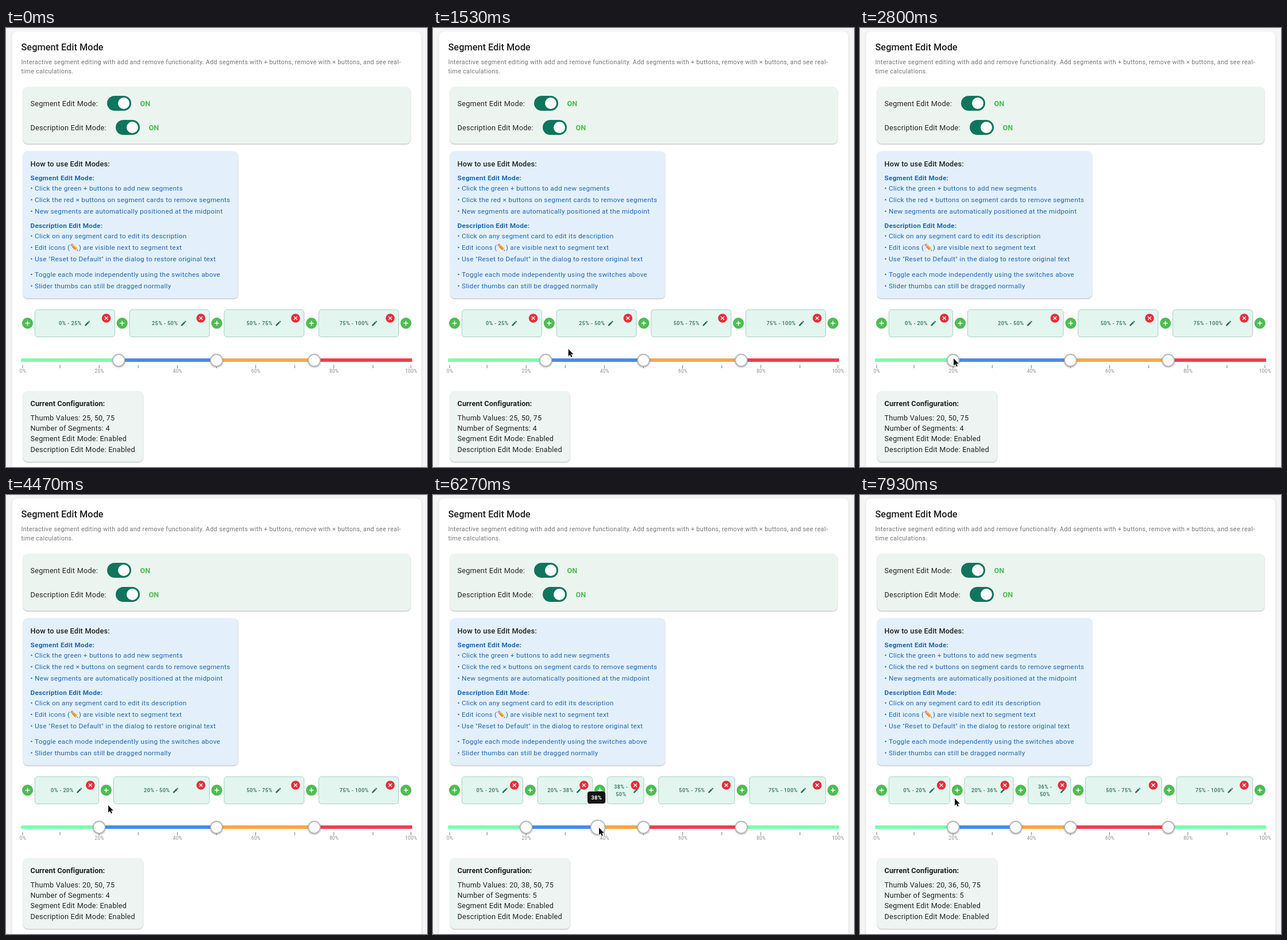
Recreate the animation shown at these times as an HTML page with a canvas. Size 733 by 764 pixels, loop 8000 ms.

```html
<!DOCTYPE html>
<html lang="en">
<head>
<meta charset="utf-8">
<title>Segment Edit Mode</title>
<style>
  html, body { margin: 0; width: 100%; height: 100%; overflow: hidden; background: #f5f5f5; }
  canvas { display: block; }
</style>
</head>
<body>
<canvas id="stage" width="733" height="764"></canvas>
<script>
const ctx = document.getElementById('stage').getContext('2d');
const LOOP = 8000, STEP = 200 / 3;
const TRACK_X = 26, TRACK_Y = 578, PX_PER_PERCENT = 6.81;
const CARDS_LEFT = 50.3, CARDS_WIDTH = 633.4, CARD_GAP = 25.7;
const TRACK_COLORS = ['#7bffae', '#4988f2', '#f9a743', '#f03e50'];
const INK = '#1f1f1f', BLUE = '#1f68b5', GREEN = '#4dbd51';
const PENCIL = new Path2D('M3 17.25V21h3.75L17.81 9.94l-3.75-3.75L3 17.25zM20.71 7.04a1 1 0 0 0 0-1.41l-2.34-2.34a1 1 0 0 0-1.41 0l-1.83 1.83 3.75 3.75 1.83-1.83z');
const ARROW = new Path2D('M0 0V12.6L2.9 9.9 4.9 14.3 6.9 13.4 5 9.2H8.9Z');

// Pointer path: time, x, y
const POINTER = [
  [66, 600, 420], [800, 441, 480], [930, 441, 480], [1733, 198, 573],
  [1980, 198, 573], [2066, 249, 573], [2200, 250, 573], [2350, 250, 573],
  [2600, 163, 575], [4333, 163, 575], [4466, 178, 540], [4870, 174, 513],
  [5420, 174, 513], [5930, 266, 578], [6266, 289, 579], [6300, 289, 579],
  [6530, 223, 579], [6630, 223, 579], [7066, 273, 580], [7420, 273, 580],
  [7930, 165, 528]
];

const thumbX = v => TRACK_X + v * PX_PER_PERCENT;
const within = (t, a, b) => t >= a && t < b;

function pointerAt(t) {
  if (t < POINTER[0][0]) return null;
  const i = POINTER.findIndex(k => k[0] > t);
  if (i < 0) return POINTER[POINTER.length - 1].slice(1);
  const [t0, x0, y0] = POINTER[i - 1], [t1, x1, y1] = POINTER[i];
  const u = (t - t0) / (t1 - t0), e = u * u * (3 - 2 * u);
  return [x0 + (x1 - x0) * e, y0 + (y1 - y0) * e];
}

function stateAt(t) {
  const pointer = pointerAt(t);
  const dragged = () => (pointer[0] - 2 - TRACK_X) / PX_PER_PERCENT;
  const firstDrag = within(t, 1990, 2700), secondDrag = within(t, 5920, 7110);
  const first = firstDrag ? dragged() : t < 1990 ? 25 : 20;
  const values = [first, 50, 75];
  if (t >= 5060) values.splice(1, 0, secondDrag ? dragged() : t < 5920 ? 35 : 36);
  return { pointer, values, active: firstDrag ? 0 : secondDrag ? 1 : -1 };
}

function setFont(size, weight = 400, spacing = 0) {
  ctx.font = `${weight} ${size}px Roboto, sans-serif`;
  ctx.letterSpacing = spacing + 'px';
}

// y is the middle of the capital letters
function text(str, x, y, size, color, { weight = 400, spacing = 0, align = 'left' } = {}) {
  setFont(size, weight, spacing);
  ctx.fillStyle = color;
  const width = ctx.measureText(str).width;
  ctx.fillText(str, align === 'center' ? x - (width - spacing) / 2 : x, y + size * 0.355);
  return x + width;
}

function box(x, y, w, h, r, fill, stroke) {
  ctx.beginPath();
  ctx.roundRect(x, y, w, h, r);
  ctx.fillStyle = fill;
  ctx.fill();
  if (stroke) { ctx.strokeStyle = stroke; ctx.lineWidth = 1; ctx.stroke(); }
}

function disc(x, y, r, fill) {
  ctx.beginPath();
  ctx.arc(x, y, r, 0, Math.PI * 2);
  ctx.fillStyle = fill;
  ctx.fill();
}

function line(x0, y0, x1, y1, color, width) {
  ctx.beginPath();
  ctx.moveTo(x0, y0);
  ctx.lineTo(x1, y1);
  ctx.strokeStyle = color;
  ctx.lineWidth = width;
  ctx.stroke();
}

function shadowed(color, blur, dy, draw) {
  ctx.save();
  ctx.shadowColor = color;
  ctx.shadowBlur = blur;
  ctx.shadowOffsetY = dy;
  draw();
  ctx.restore();
}

const panel = (x, y, w, h, fill) =>
  shadowed('rgba(0,0,0,.3)', 2, 1, () => box(x, y, w, h, 8, fill));

function toggle(label, y, x) {
  text(label, 42.5, y, 12.7, '#252525', { spacing: 0.227 });
  box(x, y - 13, 42, 26, 13, '#10755d');
  disc(x + 29, y, 10, '#fff');
  text('ON', x + 57.5, y, 12.7, GREEN, { weight: 600, spacing: 0.1 });
}

function emojiPencil(x, y) {
  ctx.save();
  ctx.translate(x, y);
  ctx.rotate(Math.PI / 4);
  box(-8, -2.3, 3, 4.6, 1, '#e98b91');
  box(-5.4, -2.3, 1.8, 4.6, 0, '#b5bcc0');
  box(-3.6, -2.3, 8, 4.6, 0, '#f4a62c');
  box(-3.6, 0.8, 8, 1.5, 0, '#d98323');
  ctx.beginPath();
  ctx.moveTo(4.4, -2.3);
  ctx.lineTo(8.6, 0);
  ctx.lineTo(4.4, 2.3);
  ctx.fillStyle = '#eccb9d';
  ctx.fill();
  disc(7.7, 0, 0.7, '#444');
  ctx.restore();
}

function drawPage() {
  ctx.fillStyle = '#f5f5f5';
  ctx.fillRect(0, 0, 733, 764);
  shadowed('rgba(0,0,0,.12)', 4, 1, () => box(10.5, 5.5, 712.5, 780, 9, '#fff'));

  text('Segment Edit Mode', 26.5, 33, 16.35, INK, { weight: 500 });
  const note = { spacing: 0.34 };
  text('Interactive segment editing with add and remove functionality. Add segments with + buttons, remove with × buttons, and see real-', 26.5, 59.5, 10.8, '#757575', note);
  text('time calculations.', 26.5, 75.5, 10.8, '#757575', note);

  panel(30, 102.5, 674, 99, '#ecf4f0');
  toggle('Segment Edit Mode:', 131, 176);
  toggle('Description Edit Mode:', 173, 191);

  panel(30, 214.5, 374, 256, '#e3f0fb');
  text('How to use Edit Modes:', 42.5, 236.5, 12.7, INK, { weight: 500, spacing: 0.2 });
  const heading = (str, y) => text(str, 42.5, y, 11.8, BLUE, { weight: 600, spacing: 0.25 });
  const item = (str, y) => text('• ' + str, 42.5, y, 11.8, BLUE, { spacing: 0.27 });
  heading('Segment Edit Mode:', 260.5);
  item('Click the green + buttons to add new segments', 279);
  item('Click the red × buttons on segment cards to remove segments', 299);
  item('New segments are automatically positioned at the midpoint', 319);
  heading('Description Edit Mode:', 343.5);
  item('Click on any segment card to edit its description', 362);
  const end = item('Edit icons (', 382);
  emojiPencil(end + 7.6, 381.8);
  text(') are visible next to segment text', end + 15.3, 382, 11.8, BLUE, { spacing: 0.27 });
  item('Use "Reset to Default" in the dialog to restore original text', 402);
  item('Toggle each mode independently using the switches above', 428.5);
  item('Slider thumbs can still be dragged normally', 448.5);
}

function wrap(label, maxWidth) {
  const lines = [];
  for (const word of label.split(' ')) {
    const joined = lines.length ? lines[lines.length - 1] + ' ' + word : word;
    if (lines.length && ctx.measureText(joined).width <= maxWidth) lines[lines.length - 1] = joined;
    else lines.push(word);
  }
  return lines;
}

function plusButton(x) {
  const y = 513.7;
  disc(x, y, 9.6, GREEN);
  line(x - 4, y, x + 4, y, '#fff', 1.5);
  line(x, y - 4, x, y + 4, '#fff', 1.5);
}

function segmentCard(x, w, from, to) {
  const font = { weight: 500, spacing: 0.42 };
  const label = `${from}% - ${to}%`, color = '#2c6b59';
  box(x, 490.2, w, 47.4, 5, '#e3f5ef', '#9fd0c1');

  setFont(9.1, font.weight, font.spacing);
  const room = w - 30.6, width = ctx.measureText(label).width;
  const lines = wrap(label, room);
  let iconX = x + w - 19.3;
  if (lines.length === 1) {
    const start = x + (w - width - 16) / 2;
    text(label, start, 514.2, 9.1, color, font);
    iconX = start + width + 4;
  } else {
    lines.forEach((str, i) => text(str, x + 7.3 + room / 2,
      514 + (i - (lines.length - 1) / 2) * 13, 9.1, color, { ...font, align: 'center' }));
  }
  ctx.save();
  ctx.translate(iconX, 508);
  ctx.scale(0.5, 0.5);
  ctx.fillStyle = color;
  ctx.fill(PENCIL);
  ctx.restore();

  const cx = x + w - 14.8, cy = 505, d = 2.8;
  disc(cx, cy, 7.8, '#e3303b');
  line(cx - d, cy - d, cx + d, cy + d, '#fff', 1.3);
  line(cx - d, cy + d, cx + d, cy - d, '#fff', 1.3);
}

function drawCards(stops) {
  const count = stops.length - 1;
  const total = CARDS_WIDTH - (count - 1) * CARD_GAP;
  let x = CARDS_LEFT;
  plusButton(37.5);
  for (let i = 0; i < count; i++) {
    const w = total * (stops[i + 1] - stops[i]) / 100;
    segmentCard(x, w, stops[i], stops[i + 1]);
    x += w + CARD_GAP;
    plusButton(i < count - 1 ? x - CARD_GAP / 2 : 696.3);
  }
}

function drawSlider(values, active) {
  const stops = [0, ...values, 100];
  ctx.save();
  ctx.beginPath();
  ctx.roundRect(TRACK_X, TRACK_Y - 3, 681.5, 6, 2);
  ctx.clip();
  for (let i = 0; i < stops.length - 1; i++) {
    ctx.fillStyle = TRACK_COLORS[i % TRACK_COLORS.length];
    ctx.fillRect(thumbX(stops[i]), TRACK_Y - 3, (stops[i + 1] - stops[i]) * PX_PER_PERCENT + 0.5, 6);
  }
  ctx.restore();

  for (let v = 0; v <= 100; v += 10) {
    const x = Math.min(705, Math.max(29, thumbX(v)));
    line(x, 586.5, x, 592, '#8c8c8c', 1.2);
    if (v % 20 === 0) text(v + '%', x + 0.3, 597.3, 8.2, '#8c8c8c', { spacing: 0.3, align: 'center' });
  }

  values.forEach((v, i) => {
    const r = i === active ? 13.2 : 11.2;
    shadowed('rgba(0,0,0,.35)', 3, 1, () => disc(thumbX(v), TRACK_Y + 0.3, r, '#b9b9b9'));
    disc(thumbX(v), TRACK_Y + 0.3, r - 1.8, '#fff');
  });
}

function drawTooltip(value) {
  const x = thumbX(value) - 0.2;
  box(x - 15.6, 516, 31.2, 21, 4, '#141414');
  text(value + '%', x, 526.7, 9.6, '#fff', { weight: 600, spacing: 0.3, align: 'center' });
}

function drawConfig(values) {
  panel(30, 632, 208.5, 123, '#edf4f2');
  text('Current Configuration:', 42.5, 653.5, 12.7, INK, { weight: 600, spacing: 0.1 });
  [
    'Thumb Values: ' + values.join(', '),
    'Number of Segments: ' + (values.length + 1),
    'Segment Edit Mode: Enabled',
    'Description Edit Mode: Enabled'
  ].forEach((str, i) => text(str, 42.5, 678 + i * 18.45, 12.7, '#252525', { spacing: 0.227 }));
}

function drawPointer([x, y]) {
  ctx.save();
  ctx.translate(x, y);
  ctx.lineJoin = 'round';
  ctx.lineWidth = 1.4;
  ctx.strokeStyle = '#fff';
  ctx.stroke(ARROW);
  ctx.fillStyle = '#111';
  ctx.fill(ARROW);
  ctx.restore();
}

function render(now) {
  const t = Math.floor((now % LOOP + 4) / STEP) * STEP;
  const { pointer, values, active } = stateAt(t);
  const rounded = values.map(Math.round);
  drawPage();
  drawCards([0, ...rounded, 100]);
  drawSlider(values, active);
  drawConfig(rounded);
  if (active >= 0) drawTooltip(rounded[active]);
  if (pointer) drawPointer(pointer);
}

let start;
function tick(now) {
  start ??= now;
  render(now - start);
  requestAnimationFrame(tick);
}
render(0);
requestAnimationFrame(tick);
</script>
</body>
</html>
```
